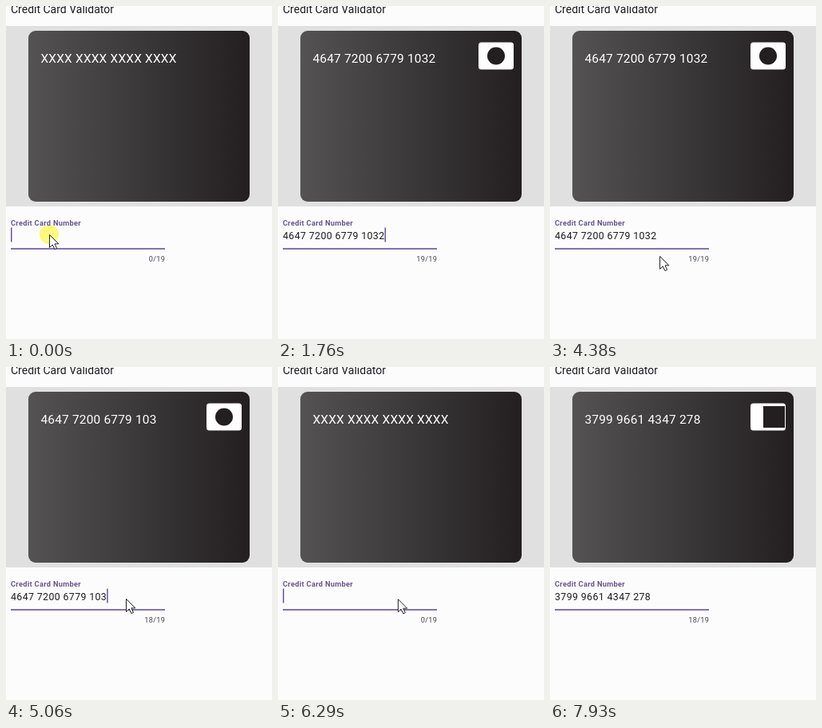
Recreate the animation shown at these times as an HTML page. Size 333 by 417 pixels, loop 8000 ms.

```html
<!DOCTYPE html>
<html lang="en">
<head>
<meta charset="utf-8">
<title>Credit Card Validator</title>
<style>
html, body { margin: 0; width: 100%; height: 100%; overflow: hidden; background: #fdfcfd; }
svg { display: block; width: 333px; height: 417px; font-family: Roboto, sans-serif; }
text { white-space: pre; }
.title { font-size: 14px; fill: #1c1b1f; }
.digits { font-size: 15.44px; letter-spacing: .193px; fill: #fff; }
.label { font-size: 9.26px; font-weight: 600; letter-spacing: .3px; fill: #65558f; }
.input { font-size: 12.35px; letter-spacing: .386px; fill: #1c1b1f; }
.count { font-size: 9.26px; letter-spacing: .31px; fill: #49454f; text-anchor: end; }
.accent { fill: #6750a4; }
</style>
</head>
<body>
<svg viewBox="0 0 333 417">
  <defs>
    <linearGradient id="shade">
      <stop stop-color="#545253"/>
      <stop offset="1" stop-color="#231f20"/>
    </linearGradient>
  </defs>
  <text class="title" x="6" y="9">Credit Card Validator</text>
  <rect y="25" width="333" height="226" fill="#e0e0e0"/>
  <rect x="28" y="31" width="277" height="214" rx="9" fill="url(#shade)"/>
  <text id="digits" class="digits" x="43.5" y="71"></text>
  <g id="badge">
    <rect x="251" y="45.5" width="44" height="34" rx="3.5" fill="#fff"/>
    <circle id="round" cx="273" cy="62.5" r="11" fill="#231f20"/>
    <rect id="square" x="267" y="49" width="27" height="27" fill="#231f20"/>
  </g>
  <circle id="press" cx="54" cy="286" r="12" fill="#fcf97c"/>
  <text class="label" x="6" y="274.5">Credit Card Number</text>
  <text id="input" class="input" x="6" y="291.5"></text>
  <rect id="caret" class="accent" y="277.5" width="1.5" height="18"/>
  <rect class="accent" x="6" y="303.2" width="193" height="1.6"/>
  <text id="count" class="count" x="199.3" y="320.3"></text>
  <path id="pointer" d="M.5 .5V16.5L4.2 13L6.9 18.6L9.5 17.4L7 11.9H11.8Z" fill="#fff" stroke="#222" stroke-linejoin="round"/>
</svg>
<script>
const LOOP = 8000;
const FIRST = "4647 7200 6779 1032", SECOND = "3799 9661 4347 278";
const PASTE_1 = 480, PASTE_2 = 7130, ERASE = 4930;
// [time, x, y] of the pointer tip
const PATH = [
  [4100, -12, 300], [4380, 137, 313], [4600, 160, 304], [4860, 150, 290],
  [6290, 150, 290], [6500, 122, 352], [6710, 80, 308], [6990, 54, 287]
];
const el = id => document.getElementById(id);
const [digits, badge, round, square, press, input, caret, count, pointer] =
  ["digits", "badge", "round", "square", "press", "input", "caret", "count", "pointer"].map(el);
const show = (node, on) => node.setAttribute("visibility", on ? "visible" : "hidden");

function textAt(t) {
  if (t < PASTE_1) return "";
  if (t >= PASTE_2) return SECOND;
  let left = FIRST.length;
  if (t >= ERASE) left = 18;
  if (t >= 5130) left = 17;
  // holding backspace repeats the deletion
  if (t >= 5400) left = Math.max(0, 16 - Math.floor((t - 5400) / 43));
  return FIRST.slice(0, left);
}

function caretAt(t) {
  if (t < PASTE_1) return true;
  if (t < ERASE) return t < 560 || (t - 560) % 1000 < 530;
  if (t < PASTE_2) return t < 6600 || t >= 7090;
  return t < 7530;
}

function pointerAt(t) {
  if (t < PASTE_1) return [54, 286];
  if (t < PATH[0][0] || t >= PASTE_2) return null;
  const i = PATH.findIndex(p => p[0] > t);
  if (i < 0) return PATH.at(-1).slice(1);
  const [t0, x0, y0] = PATH[i - 1], [t1, x1, y1] = PATH[i];
  const k = (t - t0) / (t1 - t0);
  return [x0 + (x1 - x0) * k, y0 + (y1 - y0) * k];
}

function draw(t) {
  const value = textAt(t), n = value.length;
  digits.textContent = value || "XXXX XXXX XXXX XXXX";
  input.textContent = value;
  count.textContent = n + "/19";
  show(badge, n);
  show(round, n && value[0] === "4");
  show(square, n && value[0] === "3");
  show(press, t < 70);
  show(caret, caretAt(t));
  caret.setAttribute("x", 6 + (n ? input.getComputedTextLength() : 0));
  const tip = pointerAt(t);
  show(pointer, tip);
  if (tip) pointer.setAttribute("transform", `translate(${tip})`);
}

const start = performance.now();
function tick() {
  draw((performance.now() - start) % LOOP);
  requestAnimationFrame(tick);
}
tick();
</script>
</body>
</html>
```
